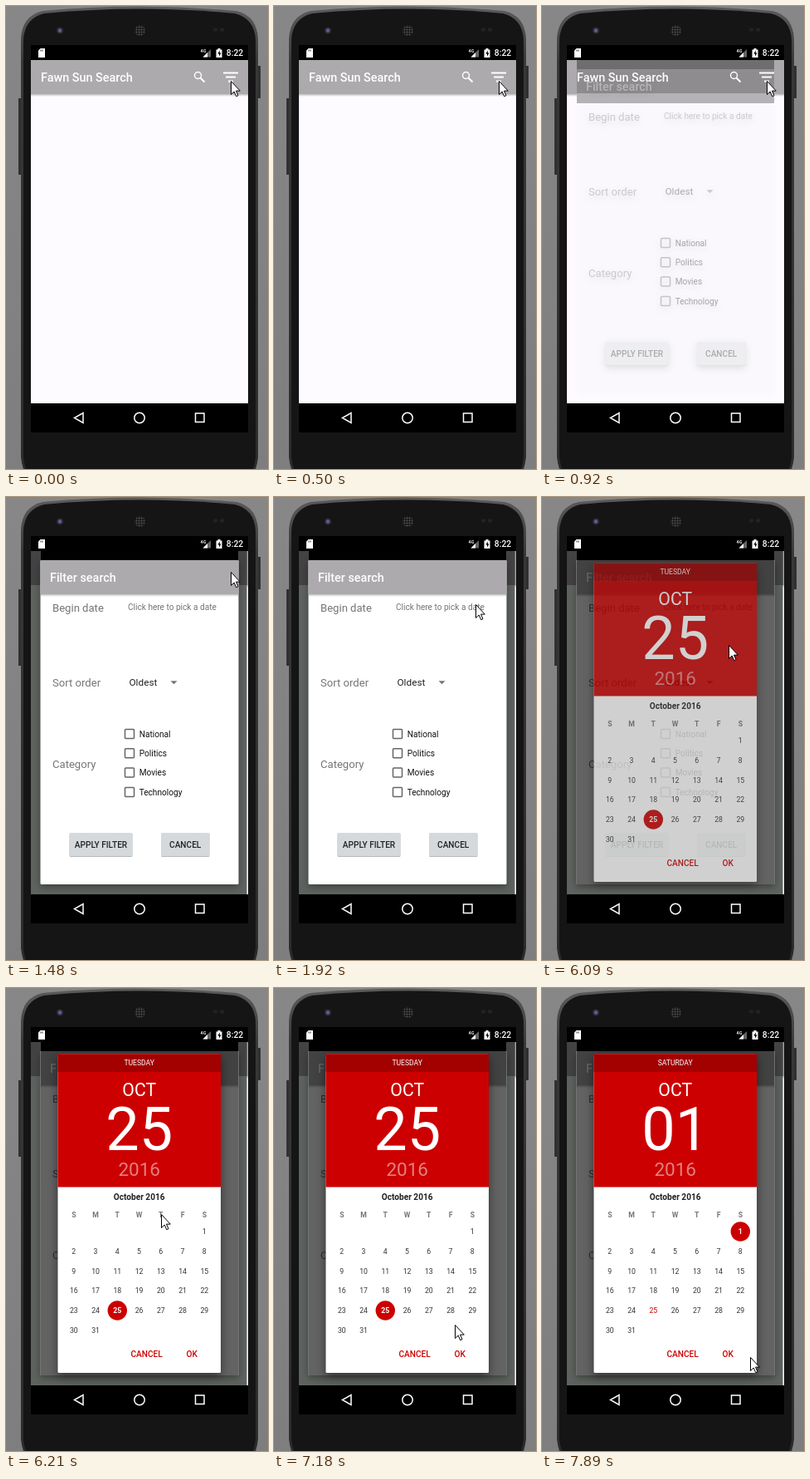
An HTML page that plays this animation: 316x557 px, repeating every 8 s.

```html
<!DOCTYPE html>
<html lang="en">
<head>
<meta charset="utf-8">
<title>Date filter</title>
<style>
  html, body { margin: 0; width: 100%; height: 100%; overflow: hidden; background: #828282; }
  svg { display: block; width: 316px; height: 557px; font: 10.1px Roboto, sans-serif; }
  .medium { font-weight: 500; }
  .title { font-size: 14.4px; font-weight: 500; fill: #fff; }
  .label { font-size: 13.1px; fill: #757575; }
  .middle { text-anchor: middle; }
  .line { fill: none; stroke: #fff; stroke-width: 1.5; }
  #days { font-size: 8.7px; fill: #333; }
  #filter { filter: drop-shadow(0 3px 4px rgba(0, 0, 0, .35)); }
  #picker { filter: drop-shadow(0 4px 6px rgba(0, 0, 0, .5)); }
</style>
</head>
<body>
<svg viewBox="0 0 316 557">
  <defs>
    <linearGradient id="backdrop" x2="0" y2="1">
      <stop stop-color="#878787"/><stop offset="1" stop-color="#7e7e7e"/>
    </linearGradient>
    <linearGradient id="rim" x2="0" y2="1">
      <stop stop-color="#5c5c5c"/><stop offset=".12" stop-color="#383838"/><stop offset="1" stop-color="#2b2b2b"/>
    </linearGradient>
    <linearGradient id="barShadow" x2="0" y2="1">
      <stop stop-color="#000" stop-opacity=".25"/><stop offset="1" stop-color="#000" stop-opacity="0"/>
    </linearGradient>
    <pattern id="mesh" width="3" height="3" patternUnits="userSpaceOnUse">
      <rect width="3" height="3" fill="#161616"/><circle cx="1.5" cy="1.5" r="1" fill="#555"/>
    </pattern>
  </defs>

  <!-- Phone -->
  <rect width="316" height="557" fill="url(#backdrop)"/>
  <path d="M15 111h4v92h-4zM303 72h4v39h-4z" fill="#303030"/>
  <path d="M18 543V40Q19 12 44 6Q161-5 278 6Q303 12 304 40V543Q303 552 300 560H22Q19 552 18 543Z" fill="url(#rim)"/>
  <path d="M21 543V41Q22 15 46 9Q161-2 276 9Q300 15 301 41V543Q300 552 297 560H25Q22 552 21 543Z" fill="#151515"/>
  <circle cx="65" cy="29.5" r="4" fill="#2c2c34"/>
  <circle cx="65" cy="29.5" r="2.2" fill="#5a5f96"/>
  <circle cx="161.500" cy="29.5" r="6.500" fill="url(#mesh)"/>
  <path d="M250 28.500h5m3 0h5" stroke="#222" stroke-width="4"/>

  <!-- App -->
  <rect x="30" y="47" width="262" height="466"/>
  <rect x="30" y="65" width="262" height="413" fill="#fdfbff"/>
  <rect x="30" y="65" width="262" height="41" fill="#acaaac"/>
  <rect x="30" y="106" width="262" height="3" fill="url(#barShadow)"/>
  <g id="fadeBands">
    <rect x="42" y="65" width="238" height="11" fill="#6f6d6f"/>
    <rect x="42" y="76" width="238" height="29" fill="#8b898b"/>
    <rect x="42" y="105" width="238" height="12" fill="#b3b1b3"/>
  </g>
  <text x="42" y="91" class="title">Fawn Sun Search</text>
  <circle cx="231.500" cy="83.500" r="4" class="line"/>
  <path d="M234.500 86.500l5 5" class="line" style="stroke-width:2"/>
  <path d="M262 80.500h18m-15 5h12m-9 5h6" class="line" style="stroke-width:2"/>

  <!-- System bars -->
  <g fill="#fff">
    <path d="M41.500 51H47V62H39V53.500z"/>
    <path d="M42 52.500v2m2-2v2" stroke="#000" stroke-width=".8"/>
    <text x="234.500" y="55.500" font-size="5.500" class="medium">4G</text>
    <path d="M247 52V61.500H237.500z" fill="#666"/>
    <path d="M243 56v5.500h-5.500z"/>
    <path d="M255.500 51h3v1.500h2V62h-7V52.500h2z"/>
    <path d="M257.800 53.500l-2.500 4h1.700v3l2.500-4h-1.700z" fill="#000"/>
    <text x="265.800" y="60" class="medium" font-size="10.300">8:22</text>
  </g>
  <path d="M93 489.500V501.500L82.500 495.500zM228.500 490h10.500v10.500h-10.500z" class="line"/>
  <circle cx="161" cy="495.500" r="6.200" class="line"/>

  <!-- Dimmed app behind dialogs -->
  <g id="dim">
    <rect x="30" y="65" width="260.500" height="413" fill="#5e635f"/>
    <rect x="30" y="65" width="260.500" height="41" fill="#434344"/>
    <rect x="42" y="65" width="238" height="12"/>
  </g>

  <g id="filter">
    <rect id="sheet" x="41.500" y="76" width="239" height="390" rx="1.500" fill="#fff"/>
    <g id="header">
      <rect x="41.500" y="76" width="239" height="41" fill="#acaaac"/>
      <rect x="41.500" y="117" width="239" height="3" fill="url(#barShadow)"/>
    </g>
    <text x="53" y="102" class="title">Filter search</text>
    <text x="56" y="137.500" class="label">Begin date</text>
    <text x="147" y="136.300" fill="#757575">Click here to pick a date</text>
    <text x="56" y="227.500" class="label">Sort order</text>
    <text x="148.500" y="227" font-size="11.800" fill="#222">Oldest</text>
    <path d="M198.500 221.300h8l-4 4z" fill="#757575"/>
    <text x="56" y="325.500" class="label">Category</text>
    <g id="categories"></g>
    <g class="medium" fill="#222">
      <rect x="76.500" y="404.500" width="76" height="28.500" rx="1.500" fill="#b8bbbd"/>
      <rect x="76.500" y="404" width="76" height="28" rx="1.500" fill="#d6d9db"/>
      <text x="114.500" y="421.500" class="middle">APPLY FILTER</text>
      <rect x="187" y="404.500" width="58.500" height="28.500" rx="1.500" fill="#b8bbbd"/>
      <rect x="187" y="404" width="58.500" height="28" rx="1.500" fill="#d6d9db"/>
      <text x="216.200" y="421.500" class="middle">CANCEL</text>
    </g>
    <rect id="shade" x="41.500" y="76" width="239" height="390" rx="1.500" opacity=".61"/>
  </g>

  <g id="picker">
    <rect x="62.500" y="79.500" width="196.500" height="383.500" rx="1.500" fill="#fff"/>
    <rect x="62.500" y="79.500" width="196.500" height="160" fill="#c00"/>
    <rect x="62.500" y="79.500" width="196.500" height="21.500" fill="#a30000"/>
    <g class="middle" fill="#fff">
      <text id="weekday" x="160.700" y="93.300" font-size="8.600"></text>
      <text x="160.700" y="129.500" font-size="21.200">OCT</text>
      <text id="bigDay" x="160.700" y="195" font-size="72"></text>
      <text x="160.700" y="226" font-size="22.500" opacity=".5">2016</text>
      <text x="160.700" y="255.300" font-weight="700" fill="#222">October 2016</text>
    </g>
    <g id="days" class="middle"></g>
    <g class="medium" fill="#c00">
      <text x="150.500" y="444">CANCEL</text>
      <text x="217.500" y="444">OK</text>
    </g>
  </g>

  <path id="cursor" d="M.5.5V16.500L4.200 13L6.700 18.700L9 17.700L6.500 12.100H11.300Z" fill="#fff" stroke="#000"/>
</svg>

<script>
const LOOP = 8000;
const TIMES = { fadeIn: 920, filter: 1480, pickerFade: 5660, picker: 6210, dayPicked: 7890 };
// [time, x, y] of each pointer position
const POINTER = [
  [0, 271, 90], [1790, 257, 110], [1920, 243, 129], [6090, 225, 178],
  [6210, 187, 272], [6330, 194, 280], [6480, 213, 284], [6600, 231, 289],
  [6720, 243, 292], [7180, 218, 405], [7300, 222, 433], [7610, 223, 437], [7890, 251, 444]
];
const $ = id => document.getElementById(id);
const show = (id, visible) => { $(id).style.display = visible ? '' : 'none'; };

$('categories').innerHTML = ['National', 'Politics', 'Movies', 'Technology'].map((name, i) => {
  const y = 285 + i * 23.3;
  return `<rect x="143.500" y="${y - 5.5}" width="11" height="11" rx="1" fill="none" stroke="#666" stroke-width="1.500"/>
    <text x="160.700" y="${y + 3.8}" fill="#111">${name}</text>`;
}).join('');

function calendar(selected) {
  const columnX = column => 81.800 + column * 26.25;
  let markup = [...'SMTWTFS'].map((letter, i) =>
    `<text x="${columnX(i)}" y="275.500" font-weight="700" fill="#777">${letter}</text>`).join('');
  for (let day = 1; day <= 31; day++) {
    const cell = day + 5;
    const x = columnX(cell % 7), y = 293 + Math.floor(cell / 7) * 23.75;
    const active = day === selected;
    if (active) markup += `<circle cx="${x}" cy="${y}" r="11.700" fill="#c00"/>`;
    const style = active ? 'fill="#fff" font-weight="700"' : day === 25 ? 'fill="#c00"' : '';
    markup += `<text x="${x}" y="${y + 3.1}" ${style}>${day}</text>`;
  }
  return markup;
}

let shownDay;
function selectDay(day) {
  if (day === shownDay) return;
  shownDay = day;
  $('weekday').textContent = day === 1 ? 'SATURDAY' : 'TUESDAY';
  $('bigDay').textContent = String(day).padStart(2, '0');
  $('days').innerHTML = calendar(day);
}

function draw(now) {
  const t = now % LOOP;
  const fading = t >= TIMES.fadeIn && t < TIMES.filter;
  const pickerOpen = t >= TIMES.pickerFade;
  show('fadeBands', fading);
  show('header', !fading);
  show('dim', t >= TIMES.filter);
  show('filter', t >= TIMES.fadeIn);
  show('shade', pickerOpen);
  show('picker', pickerOpen);
  $('sheet').setAttribute('fill-opacity', fading ? 0.1 : 1);
  $('filter').style.opacity = fading ? 0.37 : 1;
  $('picker').style.opacity = t < TIMES.picker ? 0.7 : 1;
  selectDay(t < TIMES.dayPicked ? 25 : 1);
  const [, x, y] = POINTER.findLast(([start]) => start <= t);
  $('cursor').setAttribute('transform', `translate(${x} ${y})`);
  requestAnimationFrame(() => draw(performance.now()));
}
draw(performance.now());
</script>
</body>
</html>
```
